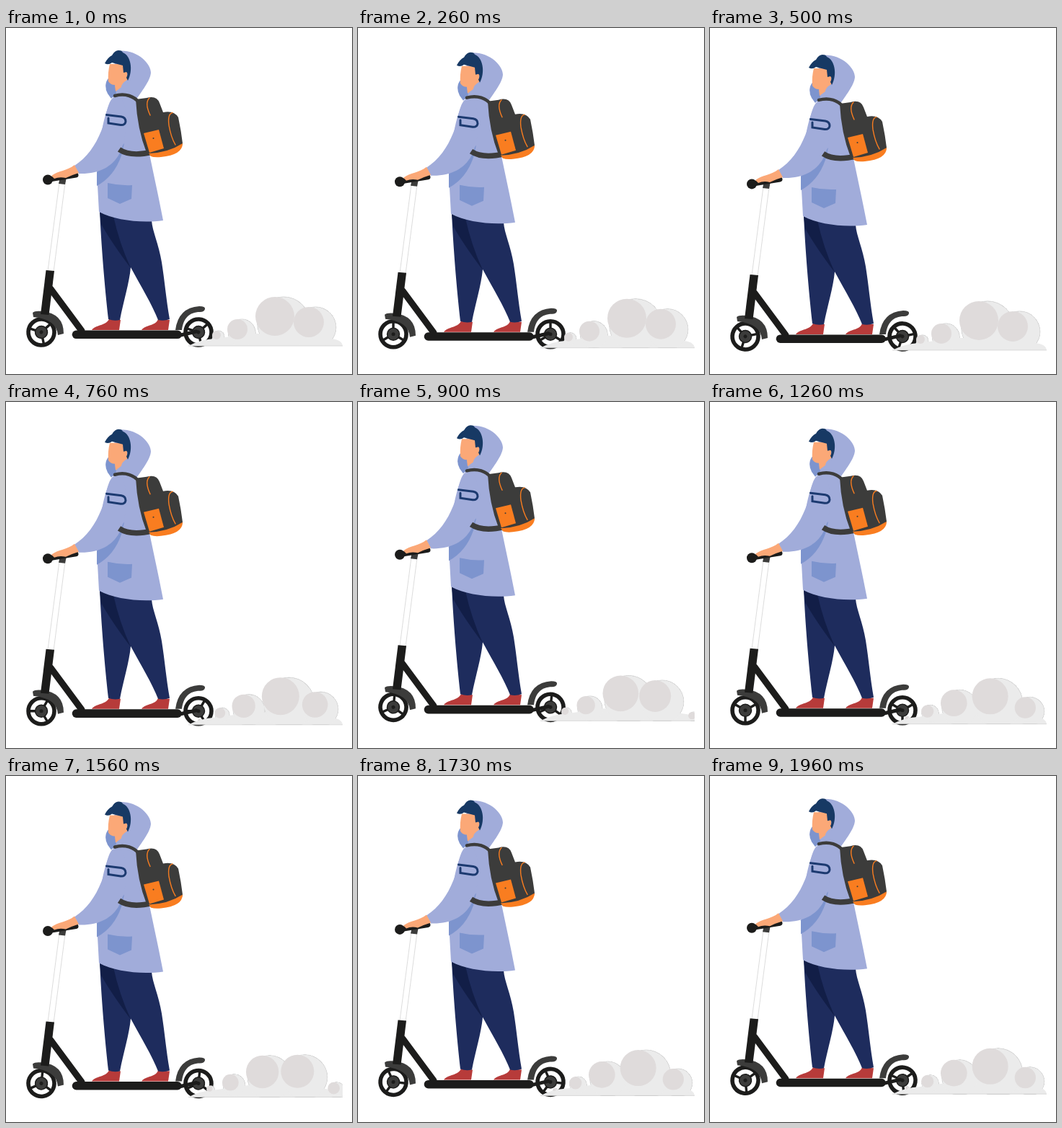
An HTML page that plays this animation: 480x480 px, repeating every 2000 ms.

```html
<!DOCTYPE html>
<html lang="en">
<head>
<meta charset="utf-8">
<title>Scooter ride</title>
<style>
html, body { margin: 0; width: 100%; height: 100%; overflow: hidden; background: #fff; }
svg { display: block; width: 100vw; height: 100vh; }
.line { fill: none; stroke-linecap: round; }
.black { stroke: #1c1c1b; }
.grey { fill: #3c3c3b; }
.coat { fill: #a1acda; }
.shade { fill: #7d94ce; }
.skin { fill: #fba877; }
.shoe { fill: #b73b3a; }
.orange { fill: #f97d20; }
</style>
</head>
<body>
<svg viewBox="0 0 480 480">
<defs>
  <clipPath id="ground"><rect x="240" y="340" width="227" height="101"/></clipPath>
  <g id="wheel" class="line black">
    <circle r="18" stroke-width="5.6"/>
    <path d="M0 0V-17M0 0L14.7 8.5M0 0L-14.7 8.5" stroke-width="3.4"/>
    <circle r="8.5" fill="#3c3c3b" stroke-width="1.5"/>
    <circle r="2.5" fill="#1c1c1b" stroke="none"/>
  </g>
</defs>
<g id="ride">
  <!-- scooter -->
  <g class="wheel" data-x="49"><use href="#wheel"/></g>
  <g class="wheel" data-x="267"><use href="#wheel"/></g>
  <path class="grey" d="M37 395Q40 392 50 393Q80 396 80 424L72 426Q70 404 38 401Z"/>
  <path class="grey" d="M235 419Q239 388 268 386Q277 386 276 390Q275 394 269 394C254 394 246 403 244 419Z"/>
  <path class="line black" d="M238 427L264 421" stroke-width="5"/>
  <path class="line black" d="M97.5 425.3H238" stroke-width="11.6"/>
  <path class="line black" d="M62 362L105 420" stroke-width="9"/>
  <path d="M74 214L82 215L66 338L58 337Z" fill="#fff" stroke="#d4d4d4" stroke-width=".8"/>
  <path d="M55.5 336L67 337L59.5 398L48 397Z" fill="#1c1c1b"/>
  <path class="grey" d="M75 207L84 207L82 217L73 216Z"/>
  <path class="line black" d="M60 210L97 204" stroke-width="7"/>
  <circle cx="58" cy="210.5" r="7" fill="#1c1c1b"/>

  <!-- legs -->
  <path class="shoe" d="M119 419C125 411 137 414 143 404L159 405L157 419Z"/>
  <path class="shoe" d="M188 419C194 411 207 414 211 404L227 405L225 419Z"/>
  <path d="M130 253Q160 266 202 267C203 282 212 300 216 325S222 375 227 404Q219 407 211 405C203 384 187 358 173 332C171 354 163 379 158 405Q150 407 142 404C137 360 132 300 130 253Z" fill="#1e2c5d"/>
  <path d="M130 255L149 261Q157 298 173 333Q146 297 132 272Z" fill="#121e47"/>

  <!-- head -->
  <path class="coat" d="M158 31.5C184 31 201 50 201 62C200 74 187 89 181 99L149 97L141 88C137 80 138 74 142 70Z"/>
  <path class="shade" d="M142 70Q135 80 141 91L146 98L153 90L151 79Z"/>
  <path class="skin" d="M144 50L168 50L168 72Q160 77 160 82L152 88L151 79Q145 79 142 74Q141 62 144 50Z"/>
  <path d="M137 49Q141 41 147 38Q151 31 156 31Q161 31 162 34C173 38 177 58 169 73L167 69Q170 63 167 61L163 62L162 52L147 48Q142 52 137 49Z" fill="#173964"/>

  <!-- coat -->
  <path class="coat" d="M148 98C163 91 179 95 184 108L197 165C203 195 212 235 218 267C188 271 152 267 129 255L126 200C130 160 134 118 148 98Z"/>
  <path class="shade" d="M126 200L126 219Q150 206 160 177L164 160Z"/>
  <path class="coat" d="M148 97C139 106 139 128 132 143C124 163 112 180 95 191L101 202C128 203 147 193 157 175C167 158 172 115 160 98Z"/>
  <path class="shade" d="M141 215Q158 219 175 218L174 237L158 244L141 236Z"/>
  <path class="line" d="M139.5 120.5L160 123Q166 124 166 130Q165 135 159 134.5L142 132V125" stroke="#1c3a70" stroke-width="3"/>
  <path class="skin" d="M63 205C72 198 85 198 95 190L101 201Q91 204 83 208Q74 206 67 209Z"/>

  <!-- backpack -->
  <path class="line" d="M151 94C166 90 178 95 184 103" stroke="#3c3c3b" stroke-width="4.5"/>
  <path d="M157 168.5C168 176 186 176 203 172" fill="none" stroke="#3c3c3b" stroke-width="7.5"/>
  <path class="grey" d="M180 99L195 97Q209 93 213 104L218 117Q233 114 239 124Q243 143 245 160C243 172 218 180 202 178L195 173Q182 140 180 99Z"/>
  <path class="orange" d="M198 174Q225 173 245 160Q245 176 215 179Q206 180 201 178Z"/>
  <path class="orange" d="M191 146L212 141L219 167L199 173Z"/>
  <circle cx="204.5" cy="153" r="1" fill="#3c3c3b"/>
  <path class="line" d="M200 121Q192 104 199 97M231 117.5Q224 119 226 135Q229 152 235 162" stroke="#f97d20" stroke-width="1.4"/>

  <g id="smoke" clip-path="url(#ground)"></g>
  <path d="M253 441H467" stroke="#d2d2d2" stroke-width=".8"/>
</g>
</svg>
<script>
const FRAMES = 60, LOOP = 2000, STEP = LOOP / FRAMES;
const ride = document.getElementById('ride');
const smoke = document.getElementById('smoke');
const wheels = document.querySelectorAll('.wheel');

// turning points of the bounce: time, drop
const bounce = [[0, 0], [720, 8], [950, 0], [1333, 6.5], [LOOP, 0]];
// path of a puff, one point per smoke cycle: x, y, radius
const path = [[263, 436, 0], [292, 426, 6], [321, 418, 14], [373, 400, 27], [420, 408, 21], [472, 439, 2]];

const mix = (a, b, p) => a + (b - a) * p;

function drop(t) {
  const i = bounce.findIndex(([time]) => time > t);
  const [t0, y0] = bounce[i - 1], [t1, y1] = bounce[i];
  const p = (t - t0) / (t1 - t0);
  const eased = (1 - Math.cos(Math.PI * p)) / 2;
  return mix(y0, y1, (p + eased) / 2);
}

const circle = (x, y, r, style) => `<circle cx="${x}" cy="${y}" r="${r}" ${style}/>`;

function drawSmoke(phase) {
  const puffs = path.slice(1).map((end, i) => end.map((v, j) => mix(path[i][j], v, phase)));
  const outer = style => puffs.map(([x, y, r]) =>
    circle(x + r * .45, y + r * .35, r * 1.35, style)).join('');
  const base = '<path d="M253 441Q270 432 290 431L340 424H420L450 431Q466 432 467 441Z" fill="#ebebeb"/>';
  const inner = puffs.map(([x, y, r]) => circle(x, y, r, 'fill="#dfdbdb"')).join('');
  smoke.innerHTML = outer('stroke="#d2d2d2"') + base + outer('fill="#ebebeb"') + inner;
}

function draw() {
  // a small lead absorbs the rounding of frame times
  const tick = Math.floor((performance.now() % LOOP + 8) / STEP) % FRAMES;
  ride.setAttribute('transform', `translate(0 ${drop(tick * STEP)})`);
  for (const w of wheels)
    w.setAttribute('transform', `translate(${w.dataset.x} 422) rotate(${48 - tick * 6})`);
  // each smoke cycle lasts seven ticks and holds its first pose, which equals its last
  drawSmoke(Math.max(0, tick % 7 - 1) / 6);
  requestAnimationFrame(draw);
}
draw();
</script>
</body>
</html>
```
